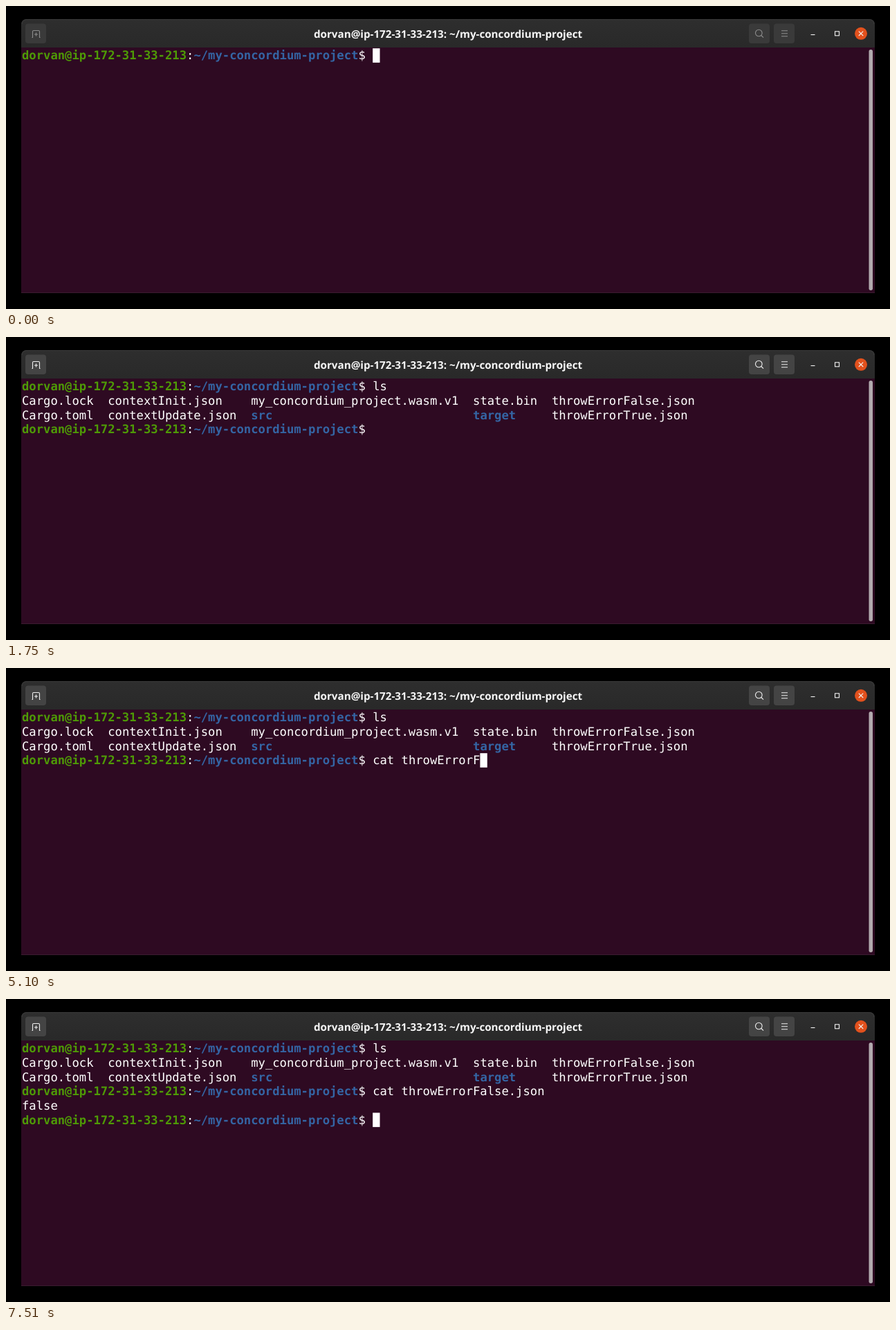
An HTML page that plays this animation: 1278 px wide and 438 px high, repeating every 8 s.

```html
<!DOCTYPE html>
<html lang="en">
<head>
<meta charset="utf-8">
<title>Terminal</title>
<style>
html, body { margin: 0; width: 100%; height: 100%; overflow: hidden; background: #000; }
svg { display: block; width: 100%; height: 100%; }
text { white-space: pre; text-rendering: geometricPrecision; }
#term text { font: 17.19px "DejaVu Sans Mono", monospace; fill: #fff; }
#term .user { fill: #4e9a06; font-weight: 700; }
#term .dir { fill: #3465a4; font-weight: 700; }
#title { font: 700 15.2px "Open Sans", "Noto Sans", sans-serif; fill: #f7f7f7; text-anchor: middle; }
</style>
</head>
<body>
<svg viewBox="0 0 1278 438">
  <defs>
    <linearGradient id="bar" x1="0" y1="0" x2="0" y2="1">
      <stop offset="0" stop-color="#2e2e2e"/>
      <stop offset="1" stop-color="#292929"/>
    </linearGradient>
  </defs>
  <rect width="1278" height="438"/>
  <path d="M22 60V27q0-8 8-8H1248q8 0 8 8V60z" fill="url(#bar)"/>
  <path d="M23 26q1-6.500 7-6.500H1248q6 0 7 6.500" fill="none" stroke="#3b3b3b"/>
  <rect x="22" y="60" width="1234" height="355" fill="#2e0a22"/>
  <path d="M22 414.500H1256" stroke="#3a1c30"/>
  <rect x="1247.500" y="63" width="5.500" height="348" rx="2.750" fill="#b2aaae"/>

  <g id="buttons">
    <rect x="28" y="25.500" width="30" height="28.500" rx="4"/>
    <rect x="1074" y="25.500" width="30" height="28.500" rx="4"/>
    <rect x="1110" y="25.500" width="30" height="28.500" rx="4"/>
  </g>
  <g id="icons" fill="none" stroke-width="1.100">
    <path d="M37.500 45.500H38.500V37q0-1.500 1.500-1.500H47q1.500 0 1.500 1.500V45.500H49.500M43.500 38.500V43.500M41 41H46"/>
    <circle cx="1088.300" cy="39" r="4.800"/>
    <path d="M1091.800 42.500L1095 45.700M1121 35.800H1130M1121 39.800H1130M1121 43.800H1130"/>
  </g>
  <g fill="none" stroke="#f2f2f2" stroke-width="1.100">
    <path d="M1163.500 41.500H1169.500"/>
    <rect x="1198.500" y="36.800" width="6" height="6"/>
    <circle cx="1236" cy="39.800" r="9" fill="#e2511d" stroke="none"/>
    <path d="M1232.800 36.600l6.400 6.400m0-6.400l-6.400 6.400"/>
  </g>
  <text id="title" x="639" y="45.500"></text>
  <g id="term"></g>
</svg>
<script>
const LOOP = 8000, COL = 10.35, ROW = 20.65, LEFT = 23, TOP = 61.2;
const USER = "dorvan@ip-172-31-33-213", DIR = "~/my-concordium-project";
const PROMPT = USER.length + DIR.length + 3;
const NS = "http://www.w3.org/2000/svg";
const $ = id => document.getElementById(id);

function add(tag, attrs, parent) {
  const el = document.createElementNS(NS, tag);
  for (const k in attrs) el.setAttribute(k, attrs[k]);
  return parent.appendChild(el);
}

function write(parent, col, row, str, cls = "") {
  const el = add("text", { x: LEFT + col * COL, y: TOP + row * ROW + 16.2, class: cls }, parent);
  el.textContent = str;
  return el;
}

function prompt(parent, row) {
  write(parent, 0, row, USER, "user");
  write(parent, USER.length, row, ":");
  write(parent, USER.length + 1, row, DIR, "dir");
  write(parent, PROMPT - 2, row, "$");
  return write(parent, PROMPT, row, "");
}

const term = $("term");
const groups = [0, 1, 2].map(() => add("g", {}, term));
const promptRows = [0, 3, 5];
const inputs = promptRows.map((row, i) => prompt(groups[i], row));
const cursor = add("rect", { width: COL, height: ROW, fill: "#fff" }, term);

const listing = [
  [0, "Cargo.lock", "Cargo.toml"],
  [12, "contextInit.json", "contextUpdate.json"],
  [32, "my_concordium_project.wasm.v1", "src"],
  [63, "state.bin", "target"],
  [74, "throwErrorFalse.json", "throwErrorTrue.json"]
];
for (const [col, ...names] of listing)
  names.forEach((name, i) =>
    write(groups[1], col, i + 1, name, /^(src|target)$/.test(name) ? "dir" : ""));
write(groups[2], 0, 4, "false");
$("title").textContent = USER + ": " + DIR;

// start time, active prompt, typed characters, cursor shown
const commands = ["ls", "cat throwErrorFalse.json ", ""];
const steps = [
  [0, 0, 0, 1], [630, 0, 0, 0], [760, 0, 0, 1], [1010, 0, 1, 1], [1590, 0, 1, 0],
  [1750, 1, 0, 0], [2170, 1, 0, 1], [2580, 1, 1, 1], [2650, 1, 2, 1],
  [2810, 1, 3, 1], [2890, 1, 4, 1], [3050, 1, 5, 1], [3610, 1, 5, 0],
  [3790, 1, 14, 0], [4190, 1, 14, 1], [5100, 1, 15, 1],
  [5620, 1, 25, 0], [6200, 1, 25, 1], [6940, 1, 25, 0], [7510, 2, 0, 1]
];

const gray = v => `rgb(${v},${v},${v})`;

function draw(t) {
  const [, active, typed, on] = steps.filter(s => s[0] <= t).pop();
  groups.forEach((g, i) => g.setAttribute("visibility", i <= active ? "visible" : "hidden"));
  inputs.forEach((el, i) => {
    el.textContent = i < active ? commands[i] : i === active ? commands[i].slice(0, typed) : "";
  });
  cursor.setAttribute("x", LEFT + (PROMPT + typed) * COL);
  cursor.setAttribute("y", TOP + promptRows[active] * ROW);
  cursor.setAttribute("visibility", on ? "visible" : "hidden");

  // the header controls light up in three steps as the window gains focus
  const focus = Math.max(0, Math.min(3, Math.floor((t - 100) / 50))) / 3;
  $("buttons").setAttribute("fill", gray(Math.round(58 + 10 * focus)));
  $("icons").setAttribute("stroke", gray(Math.round(142 + 98 * focus)));
}

const start = performance.now();
function tick() {
  draw((performance.now() - start) % LOOP);
  requestAnimationFrame(tick);
}
tick();
</script>
</body>
</html>
```
